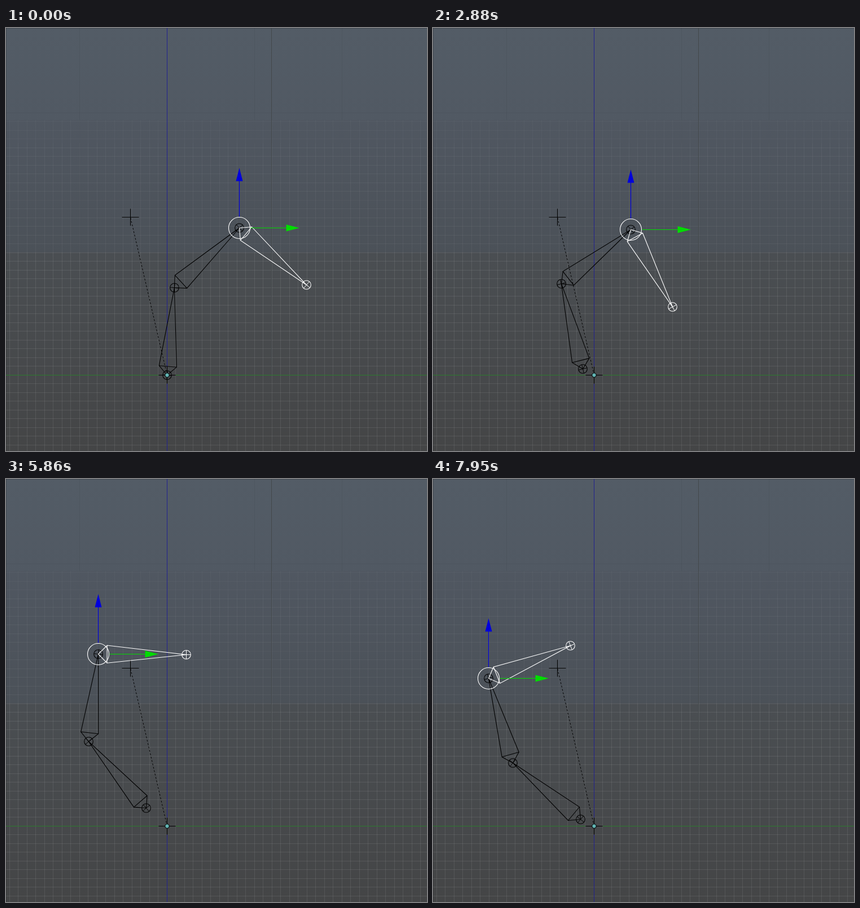
An HTML page with a canvas that plays this animation: 746x750 px, repeating every 8000 ms.

```html
<!DOCTYPE html>
<html lang="en">
<head>
<meta charset="utf-8">
<title>Bone chain</title>
<style>
  html, body { margin: 0; width: 100%; height: 100%; overflow: hidden; background: #484b4d; }
  canvas { display: block; }
</style>
</head>
<body>
<canvas id="stage" width="746" height="750"></canvas>
<script>
const W = 746, H = 750, LOOP = 8000, HOLD = 111;
const BONE = 156, GAP = 15.5;
const ORIGIN = [285, 615], TARGET = [220, 335];
const ctx = document.getElementById('stage').getContext('2d');

// Key poses: time, foot x y, hip x y, angle of the white bone in degrees
const KEYS = [
  [340, 285, 615, 413, 354, 40.3],
  [1330, 283, 615, 407, 358, 48.1],
  [2880, 265, 604, 350, 357, 61.6],
  [3950, 248, 584, 286, 334, 49.2],
  [4810, 246, 578, 234, 314, 26.7],
  [5860, 248, 583, 163, 310, 0.4],
  [7300, 256, 597, 111, 338, -17],
  [7950, 261, 603, 98, 353, -21.7]
];

function slope(i, c) {
  if (i === 0) return 0;
  const a = KEYS[i - 1], b = KEYS[Math.min(i + 1, KEYS.length - 1)];
  return (b[c] - a[c]) / (b[0] - a[0]);
}

// Smooth curve through the keys, shown in even held steps
function valuesAt(time) {
  const t = Math.min(Math.max(time, KEYS[0][0]), KEYS.at(-1)[0]);
  let i = 0;
  while (i < KEYS.length - 2 && t >= KEYS[i + 1][0]) i++;
  const a = KEYS[i], b = KEYS[i + 1], span = b[0] - a[0];
  const steps = Math.round(span / HOLD);
  const u = Math.floor((t - a[0]) / span * steps + 1e-6) / steps, v = 1 - u;
  return [1, 2, 3, 4, 5].map(c => a[c] * v * v * (1 + 2 * u) + b[c] * u * u * (3 - 2 * u)
    + span * u * v * (slope(i, c) * v - slope(i + 1, c) * u));
}

// The knee follows from foot and hip, because all bones have the same length
function poseAt(time) {
  const [fx, fy, hx, hy, degrees] = valuesAt(time);
  const dx = hx - fx, dy = hy - fy, reach = Math.hypot(dx, dy);
  const bend = Math.sqrt(Math.max(0, BONE ** 2 - reach ** 2 / 4)) / reach;
  const angle = degrees * Math.PI / 180;
  return [
    [fx, fy],
    [(fx + hx) / 2 + dy * bend, (fy + hy) / 2 - dx * bend],
    [hx, hy],
    [hx + BONE * Math.cos(angle), hy + BONE * Math.sin(angle)]
  ].map(p => p.map(Math.round));
}

function line(points, color, width = 1, close = false) {
  ctx.beginPath();
  points.forEach(p => ctx.lineTo(...p));
  if (close) ctx.closePath();
  ctx.strokeStyle = color;
  ctx.lineWidth = width;
  ctx.stroke();
}

function polygon(points, color) {
  ctx.beginPath();
  points.forEach(p => ctx.lineTo(...p));
  ctx.fillStyle = color;
  ctx.fill();
}

function circle(center, r, color, fill) {
  ctx.beginPath();
  ctx.arc(...center, r, 0, Math.PI * 2);
  if (fill) {
    ctx.fillStyle = fill;
    ctx.fill();
  }
  ctx.strokeStyle = color;
  ctx.lineWidth = 1.1;
  ctx.stroke();
}

function cross([x, y], r, angle, color) {
  const dx = r * Math.cos(angle), dy = r * Math.sin(angle);
  line([[x - dx, y - dy], [x + dx, y + dy]], color);
  line([[x + dy, y - dx], [x - dy, y + dx]], color);
}

function joint(p, angle, color) {
  circle(p, 7.8, color);
  cross(p, 7.8, angle, color);
}

function bone(head, tail, color) {
  const dx = (tail[0] - head[0]) / 10, dy = (tail[1] - head[1]) / 10;
  const left = [head[0] + dx + dy, head[1] + dy - dx];
  const right = [head[0] + dx - dy, head[1] + dy + dx];
  line([head, left, tail, right], color, 1.1, true);
  line([left, right], color, 1.1);
  joint(tail, Math.atan2(dy, dx), color);
}

function arrow([x, y], angle, color) {
  ctx.save();
  ctx.translate(x, y);
  ctx.rotate(angle);
  line([[20, 0], [85, 0]], color, 1.2);
  polygon([[83, -6], [106.5, 0], [83, 6]], color);
  ctx.restore();
}

function grid(gap, top, bottom, color) {
  ctx.fillStyle = color;
  for (let x = ORIGIN[0] % gap; x < W; x += gap) ctx.fillRect(Math.floor(x), top, 1, bottom - top);
  for (let y = ORIGIN[1] % gap; y < bottom; y += gap)
    if (y >= top) ctx.fillRect(0, Math.floor(y), W, 1);
}

function backdrop() {
  const shade = ctx.createLinearGradient(0, 0, 0, H);
  [[0, '#535c66'], [162, '#515963'], [164, '#505761'], [397, '#4b5158'], [399, '#4a4e52'], [H, '#444546']]
    .forEach(([y, color]) => shade.addColorStop(y / H, color));
  ctx.fillStyle = shade;
  ctx.fillRect(0, 0, W, H);

  grid(GAP, 163, 204, 'rgba(255,255,255,.03)');
  grid(GAP, 204, 398, 'rgba(255,255,255,.05)');
  grid(GAP, 398, H, 'rgba(255,255,255,.09)');
  grid(GAP * 10, 0, 398, 'rgba(0,0,0,.05)');

  const bar = (x, y, w, h, color) => {
    ctx.fillStyle = color;
    ctx.fillRect(x, y, w, h);
  };
  bar(0, 0, W, 1, 'rgba(0,0,0,.2)');
  bar(0, 0, 1, H, 'rgba(0,0,0,.2)');
  bar(470, 0, 1, ORIGIN[1], '#43484b');
  bar(0, ORIGIN[1], W, 1, '#2b7a2d');
  bar(ORIGIN[0], 0, 1, H, '#22228f');
}

function pointer(x, y) {
  const points = [[0, 0], [0, 20], [4.5, 16], [8, 24.5], [11.5, 23], [8, 15], [14, 14.5]]
    .map(([dx, dy]) => [x + dx, y + dy]);
  polygon(points, '#fff');
  line(points, '#444', 0.6, true);
}

function draw(time) {
  const [foot, knee, hip, tip] = poseAt(time);
  backdrop();

  ctx.save();
  ctx.translate(0.5, 0.5); // centre thin lines on pixels
  ctx.setLineDash([3.08]);
  line([ORIGIN, TARGET], '#000');
  ctx.setLineDash([]);
  cross(TARGET, 15, 0, '#000');
  cross(ORIGIN, 15, 0, '#000');

  joint(foot, Math.atan2(knee[1] - foot[1], knee[0] - foot[0]), '#000');
  bone(foot, knee, '#000');
  bone(knee, hip, '#000');
  bone(hip, tip, '#fff');
  circle(ORIGIN, 3.7, '#000', '#62b5b4');

  circle(hip, 19, '#fff');
  arrow(hip, -Math.PI / 2, '#0000dc');
  arrow(hip, 0, '#00dc00');
  if (time >= 7300 && time < 7420) pointer(120, 393);
  ctx.restore();
}

const began = performance.now();
function tick() {
  draw((performance.now() - began) % LOOP);
  requestAnimationFrame(tick);
}
tick();
</script>
</body>
</html>
```
